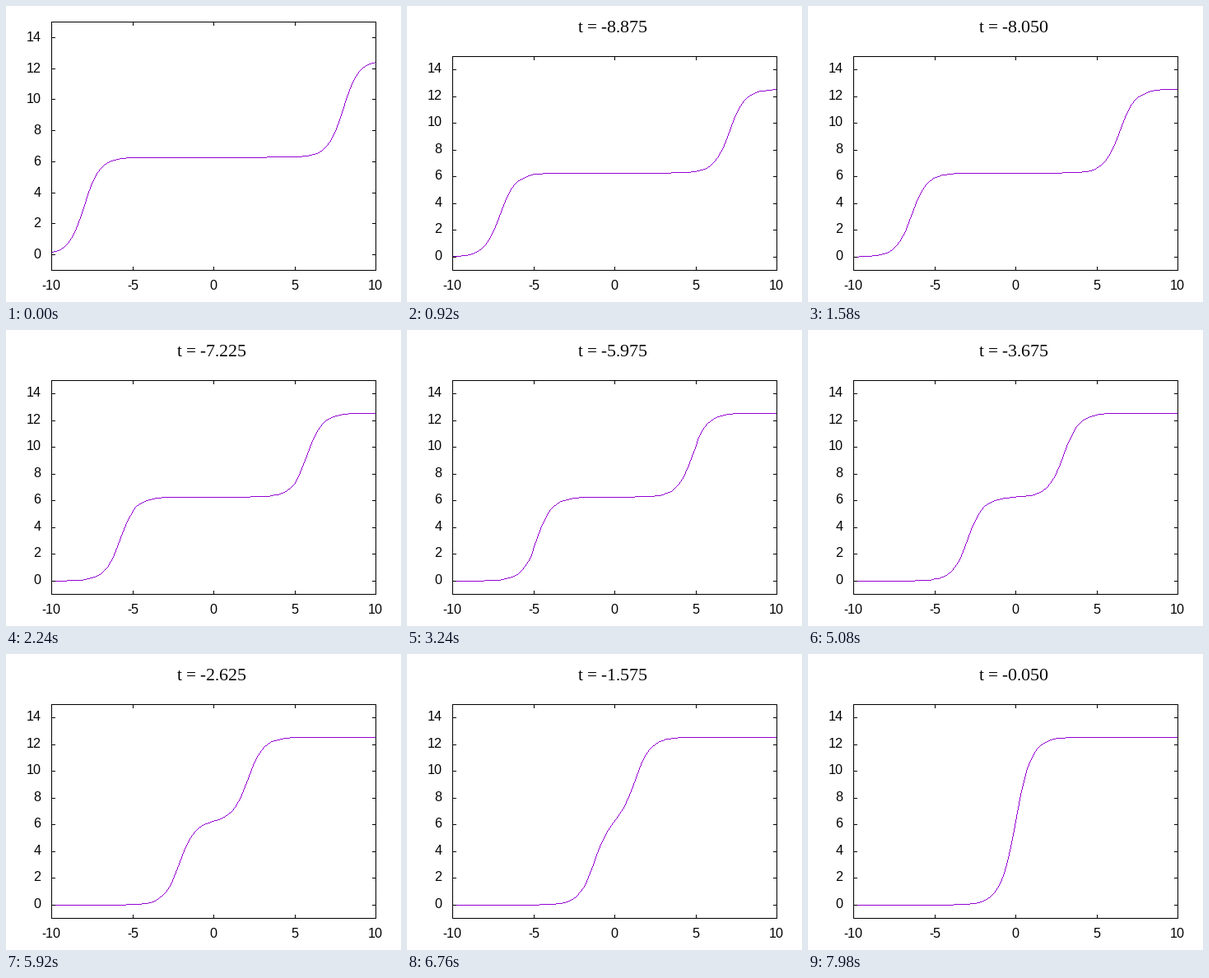
Recreate the animation shown at these times as a matplotlib script. Size 480x360 px, loop 8000 ms.

```python
import numpy as np
import matplotlib.pyplot as plt
from matplotlib.animation import FuncAnimation

plt.rcParams["text.hinting"] = "native"
plt.rcParams["text.hinting_factor"] = 1

W, H, DPI = 480, 360, 100
FRAMES, INTERVAL = 400, 20
LEFT, RIGHT, BOTTOM = 55, 449, 321
X_MAX, Y_MIN, Y_MAX = 10, -1, 15
SPEED = 0.8
GAMMA = 1 / np.sqrt(1 - SPEED ** 2)
PURPLE, BLACK = (148, 0, 211), (0, 0, 0)
TICK = 4

fig = plt.figure(figsize=(W / DPI, H / DPI), dpi=DPI, facecolor="white")
canvas = np.full((H, W, 3), 255, np.uint8)
picture = fig.figimage(canvas, origin="upper")


def label(x, y, text, font, px, ha):
    """Text with its baseline at pixel row y, counted from the top."""
    return fig.text(x / W, 1 - y / H, text, family=font, ha=ha,
                    va="baseline", fontsize=px * 72 / DPI)


def to_px(x):
    return np.floor(LEFT + (x + X_MAX) * (RIGHT - LEFT) / (2 * X_MAX) + 0.5).astype(int)


def to_py(y, top):
    scale = (BOTTOM - top) / (Y_MAX - Y_MIN)
    return BOTTOM - np.floor((y - Y_MIN) * scale + 0.5).astype(int)


samples = np.linspace(-X_MAX, X_MAX, 100)
x_ticks = np.arange(-10, 11, 5)
y_ticks = np.arange(0, 15, 2)

title = label(250.5, 32, "", "Liberation Serif", 64 / 3, "center")
for v, px in zip(x_ticks, to_px(x_ticks)):
    label(px, 345, str(v), "Liberation Sans", 16, "center")
y_labels = [label(42.5, 0, str(v), "Liberation Sans", 16, "right") for v in y_ticks]


def two_kinks(x, t):
    return 2 * np.pi + 4 * np.arctan(np.sinh(GAMMA * x) / np.cosh(GAMMA * SPEED * t))


def draw_curve(img, px, py):
    """One-pixel polyline without smoothing."""
    for x0, y0, x1, y1 in zip(px, py, px[1:], py[1:]):
        n = max(abs(x1 - x0), abs(y1 - y0))
        k = np.arange(n + 1) / n
        xs = np.floor(x0 + (x1 - x0) * k + 0.5).astype(int)
        ys = np.floor(y0 + (y1 - y0) * k + 0.5).astype(int)
        img[ys, xs] = PURPLE


def draw_box(img, top):
    img[[top, BOTTOM], LEFT:RIGHT + 1] = BLACK
    img[top:BOTTOM + 1, [LEFT, RIGHT]] = BLACK
    for x in to_px(x_ticks):
        img[top:top + TICK + 1, x] = BLACK
        img[BOTTOM - TICK:BOTTOM + 1, x] = BLACK
    for y in to_py(y_ticks, top):
        img[y, LEFT:LEFT + TICK + 1] = BLACK
        img[y, RIGHT - TICK:RIGHT + 1] = BLACK


def update(n):
    # The opening plot has no title, so its box is taller.
    top = 61 if n else 19
    t = -10 + 0.025 * max(n - 1, 0)
    title.set_text(f"t = {t:.3f}" if n else "")
    for text, y in zip(y_labels, to_py(y_ticks, top)):
        text.set_y(1 - (y + (4 if n else 5)) / H)
    canvas[:] = 255
    draw_curve(canvas, to_px(samples), to_py(two_kinks(samples, t), top))
    draw_box(canvas, top)
    picture.set_data(canvas)
    return [picture, title, *y_labels]


anim = FuncAnimation(fig, update, frames=FRAMES, interval=INTERVAL,
                     repeat=True, repeat_delay=0, blit=False)
plt.show()
```
